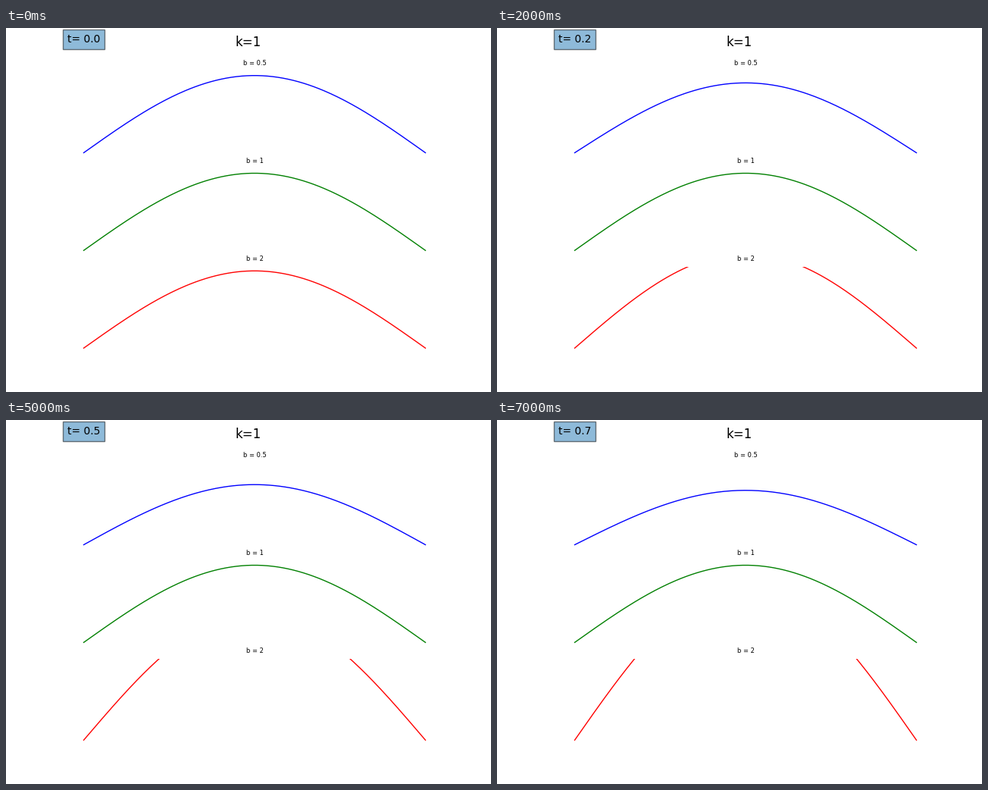
A matplotlib script for the animation above (8000 ms loop, 640 by 480 pixels).

```python
import numpy as np
import matplotlib.pyplot as plt
from matplotlib.animation import FuncAnimation

plt.rcParams["font.family"] = "DejaVu Sans"

K = 1
STEP = 0.1
FRAMES = 8
CURVES = [(0.5, "blue"), (1, "green"), (2, "red")]

x = np.linspace(0, np.pi, 200)


def profile(b, t):
    """Sine arch that decays for b < K and grows for b > K."""
    return np.exp((b - K) * t) * np.sin(x)


fig, axes = plt.subplots(3, 1, figsize=(6.4, 4.8), dpi=100)
fig.subplots_adjust(left=0.125, right=0.9, bottom=0.11, top=0.88, hspace=0.15)
fig.suptitle(f"k={K}", fontsize=12)

lines = []
for ax, (b, color) in zip(axes, CURVES):
    ax.set_xlim(-0.05 * np.pi, 1.05 * np.pi)
    ax.set_ylim(-0.05, 1.05)
    ax.set_title(f"b = {b}", fontsize=6)
    ax.axis("off")
    lines += ax.plot(x, profile(b, 0), color=color, lw=1)

clock = axes[0].text(0, 1.4, "t= 0.0", fontsize=10, ha="center", va="bottom",
                     bbox=dict(alpha=0.5))


def update(i):
    t = i * STEP
    for line, (b, _) in zip(lines, CURVES):
        line.set_ydata(profile(b, t))
    clock.set_text(f"t= {t:.1f}")
    return [*lines, clock]


anim = FuncAnimation(fig, update, frames=FRAMES, interval=1000, repeat=True)
plt.show()
```
